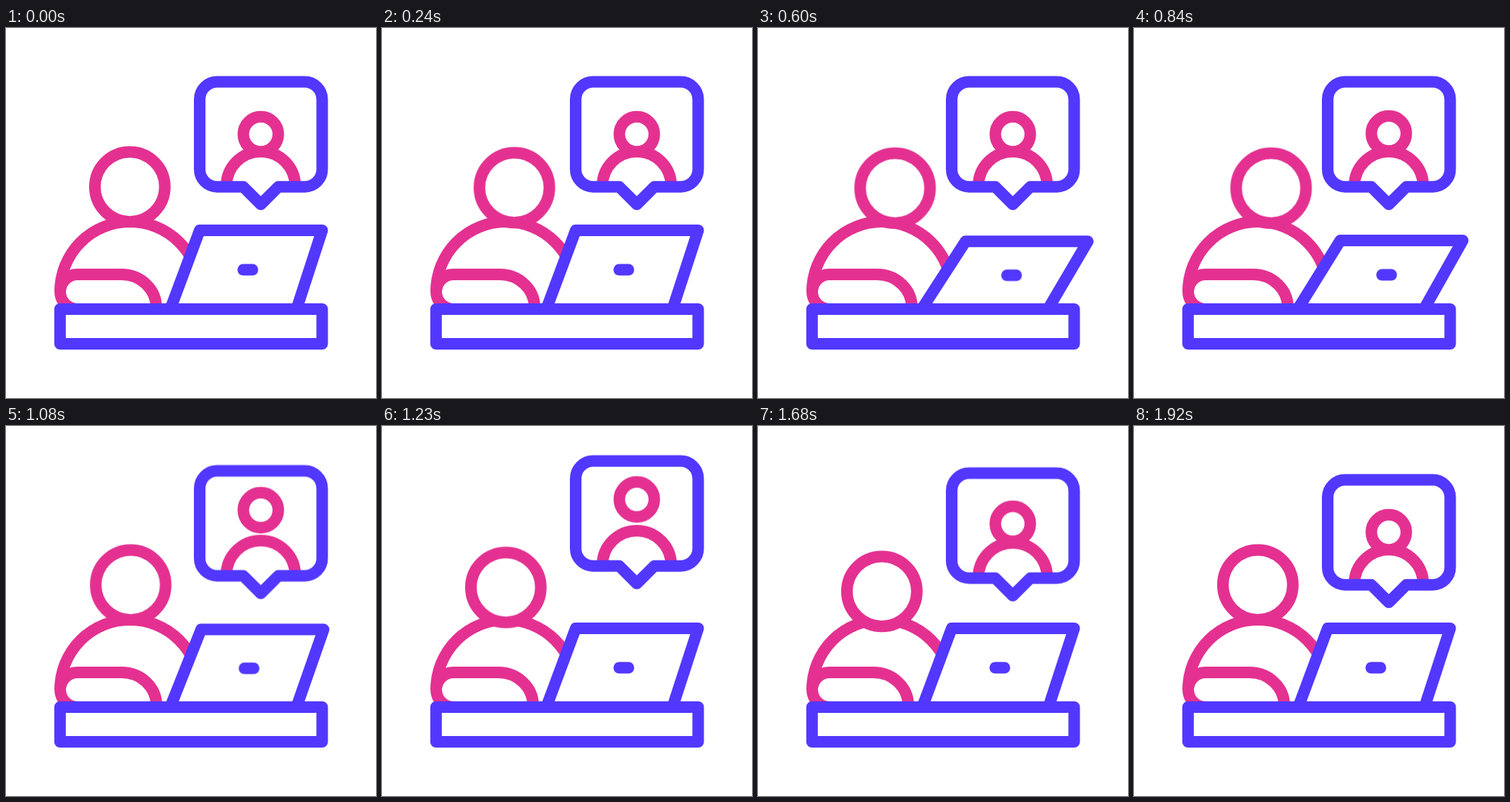
Animation of 512 by 512 pixels, one loop 2.04 s. Source, as an HTML page:

```html
<!DOCTYPE html>
<html lang="en">
<head>
<meta charset="utf-8">
<title>Video call</title>
<style>
  html, body { margin: 0; width: 100%; height: 100%; overflow: hidden; background: #fff; }
  svg { display: block; width: 100vw; height: 100vh; }

  .line { fill: none; stroke-width: 16; stroke-linejoin: round; }
  .pink { stroke: #e43191; }
  .blue { stroke: #5238ff; }
  .solid { fill: #fff; }

  .move {
    animation: 2040ms cubic-bezier(.333, 0, .667, 1) infinite;
  }
  .head { animation-name: head; }
  .arm { animation-name: arm; }
  .lid { animation-name: lid; }
  .button { animation-name: button; }
  .bubble { animation-name: bubble; }
  .caller { animation-name: caller; }

  /* lean towards the screen, return, then nod */
  @keyframes head {
    0%, 3.2%, 55.1%, 56.1%, 94.1%, 100% { transform: none; }
    17.6%, 41.2% { transform: translate(18.3px, 1.7px); }
    69.6%, 73.5% { transform: translate(0, 15px); }
  }
  @keyframes arm {
    0%, 3.2%, 55.1%, 56.1%, 81.9%, 100% { d: path("M208 387 A48 46 0 0 0 160 341 H99 A24 24 0 0 0 99 389"); }
    17.6%, 41.2%, 69.6%, 70.6% { d: path("M213 387 A48 46 0 0 0 165 341 H99 A24 24 0 0 0 99 389"); }
  }
  /* the screen tilts back and returns */
  @keyframes lid {
    0%, 12%, 56.9%, 100% { d: path("M228.5 386 L268 280 H437.5 L403 386"); }
    32%, 36.8% { d: path("M228.5 386 L288 296 H457.3 L403 386"); }
  }
  @keyframes button {
    0%, 12%, 56.9%, 100% { transform: none; }
    32%, 36.8% { transform: translate(17px, 8px); }
  }
  @keyframes bubble {
    0%, 44.1%, 91.2%, 100% { transform: none; }
    63.2%, 68.5% { transform: translateY(-27.8px); }
  }
  @keyframes caller {
    0%, 38.8%, 86.1%, 100% { transform: none; }
    55.6%, 69.1% { transform: translateY(-19.3px); }
  }
</style>
</head>
<body>
<svg viewBox="0 0 512 512">
  <path class="line pink" d="M75 364.5 A96.5 96.5 0 0 1 268 364.5"/>
  <circle class="line pink solid move head" cx="171.4" cy="219.8" r="48.4"/>
  <path class="line pink move arm" d="M208 387 A48 46 0 0 0 160 341 H99 A24 24 0 0 0 99 389"/>

  <path class="line blue solid move lid" d="M228.5 386 L268 280 H437.5 L403 386"/>
  <path class="line blue move button" d="M328.3 334.5 H341" stroke-linecap="round"/>
  <rect class="line blue solid" x="74.8" y="389" width="362.7" height="48"/>

  <g class="move bubble">
    <path class="line pink" d="M305 218.6 A47.6 47.6 0 0 1 400.2 218.6"/>
    <circle class="line pink solid move caller" cx="352.6" cy="147" r="24.2"/>
    <path class="line blue" d="M292.2 74.5 H413.3 A24.2 24.2 0 0 1 437.5 98.7 V195.6 A24.2 24.2 0 0 1 413.3 219.8 H376.8 L352.6 244 L328.4 219.8 H292.2 A24.2 24.2 0 0 1 268 195.6 V98.7 A24.2 24.2 0 0 1 292.2 74.5 Z"/>
  </g>
</svg>
</body>
</html>
```
